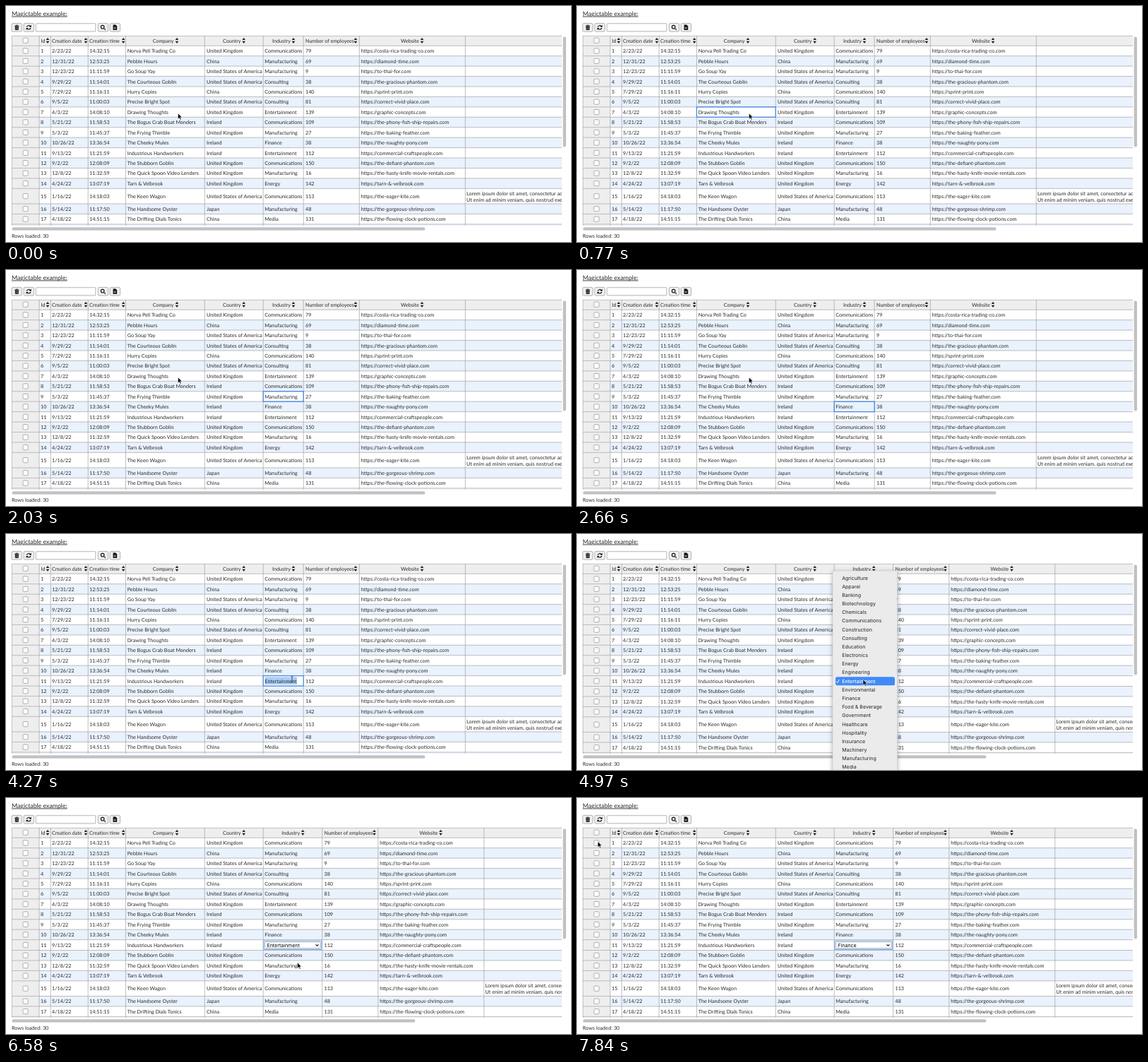
An HTML page that plays this animation: 800x334 px, repeating every 8000 ms.

```html
<!DOCTYPE html>
<html lang="en">
<head>
<meta charset="utf-8">
<title>Magictable example</title>
<style>
  html, body { margin: 0; width: 100%; height: 100%; overflow: hidden; background: #fff; }
  svg { display: block; }
  text {
    font: 7.23px Lato, sans-serif; font-variant-numeric: tabular-nums;
    fill: #2a2a2a; white-space: pre; text-rendering: geometricPrecision;
  }
  .title { font-size: 8.75px; text-decoration: underline; }
  .head { font-size: 7.15px; }
  .ui { font: 7.05px Inter, sans-serif; }
  .line { stroke: #a3a3a3; stroke-width: .7; fill: none; }
  .button { fill: #efefef; stroke: #858585; stroke-width: .6; }
  .box { fill: #fff; stroke: #7d7d7d; stroke-width: .6; }
  .focus { stroke: #3f86ea; stroke-width: 1.2; }
  .menu { fill: #ebebeb; stroke: #c4c4c4; stroke-width: .5; filter: drop-shadow(0 2px 3px #0005); }
</style>
</head>
<body>
<svg id="stage" width="800" height="334" viewBox="0 0 800 334">
  <g id="page"></g>
  <g id="menu"></g>
  <path id="arrow" d="M0 0V8L1.9 6.3L3.2 9.2L4.5 8.6L3.2 5.8H5.8Z" fill="#000" stroke="#fff" stroke-width=".5"/>
  <path id="beam" d="M-1.5 -4Q0 -4 0 -3Q0 -4 1.5 -4M0 -3V3M-1.5 4Q0 4 0 3Q0 4 1.5 4" fill="none" stroke="#222" stroke-width=".7"/>
</svg>
<script>
const LOOP = 8000, PITCH = 14.43, TOP = 56.3, WIDEN = 26.5;
const COMPANY = 4, COUNTRY = 5, INDUSTRY = 6;
const $ = id => document.getElementById(id);

// column edges, starting with the checkbox column
const edges = [8, 47, 63.3, 116.2, 169.5, 281.3, 364.2, 421.2, 500.3, 650.3];
const textX = [49, 65, 118, 171.7, 284, 366.2, 424, 502.7];

// label, text x, sort icon x
const heads = [
  ["Id", 49.6, 59], ["Creation date", 65, 113], ["Creation time", 118, 166.2],
  ["Company", 207.7, 242], ["Country", 307, 336.7], ["Industry", 377, 407],
  ["Number of employees", 424, 495], ["Website", 559, 589]
];

const countries = { U: "United Kingdom", A: "United States of America", C: "China", I: "Ireland", J: "Japan" };
const rows = `2/23/22|14:32:15|Norva Pell Trading Co|U|Communications|79|costa-rica-trading-co
12/31/22|12:53:25|Pebble Hours|C|Manufacturing|69|diamond-time
12/23/22|11:11:59|Go Soup Yay|A|Manufacturing|9|to-thai-for
9/29/22|11:14:01|The Courteous Goblin|A|Consulting|38|the-gracious-phantom
7/29/22|11:16:11|Hurry Copies|C|Communications|140|sprint-print
9/5/22|11:00:03|Precise Bright Spot|A|Consulting|81|correct-vivid-place
4/3/22|14:08:10|Drawing Thoughts|U|Entertainment|139|graphic-concepts
5/21/22|11:58:53|The Bogus Crab Boat Menders|I|Communications|109|the-phony-fish-ship-repairs
5/3/22|11:45:37|The Frying Thimble|U|Manufacturing|27|the-baking-feather
10/26/22|13:36:54|The Cheeky Mules|I|Finance|38|the-naughty-pony
9/13/22|11:21:59|Industrious Handworkers|I|Entertainment|112|commercial-craftspeople
9/2/22|12:08:09|The Stubborn Goblin|U|Communications|150|the-defiant-phantom
12/8/22|11:32:59|The Quick Spoon Video Lenders|U|Manufacturing|16|the-hasty-knife-movie-rentals
4/24/22|13:07:19|Tarn &amp; Velbrook|U|Energy|142|tarn-&amp;-velbrook
1/16/22|14:18:03|The Keen Wagon|A|Communications|113|the-eager-kite
5/14/22|11:17:50|The Handsome Oyster|J|Manufacturing|48|the-gorgeous-shrimp
4/18/22|14:51:15|The Drifting Dials Tonics|C|Media|131|the-flowing-clock-potions`
  .split("\n").map((line, i) => {
    const [date, time, company, country, industry, staff, site] = line.split("|");
    return [i + 1, date, time, company, countries[country], industry, staff, `https://${site}.com`];
  });

const options = ("Agriculture,Apparel,Banking,Biotechnology,Chemicals,Communications,Construction,Consulting," +
  "Education,Electronics,Energy,Engineering,Entertainment,Environmental,Finance,Food &amp; Beverage,Government," +
  "Healthcare,Hospitality,Insurance,Machinery,Manufacturing,Media").split(",");

const text = (x, y, s, attrs = "") => `<text x="${x}" y="${y}" ${attrs}>${s}</text>`;
const rect = (x, y, w, h, attrs) => `<rect x="${x}" y="${y}" width="${w}" height="${h}" ${attrs}/>`;
const path = (d, attrs = 'class="line"') => `<path d="${d}" ${attrs}/>`;
const checkbox = y => rect(24, y - 3.6, 7.2, 7.2, 'rx="1.4" class="box"');
const sortIcon = x => path(`M${x - 2.4} 48.1h4.8l-2.4-3.2zm0 1.6h4.8l-2.4 3.2z`, 'fill="#222"');

// row 15 holds two lines; the select makes row 11 slightly taller
const rowTop = (i, wide) => TOP + i * PITCH + (i > 14 ? 7.2 : 0) + (wide && i > 10 ? .5 : 0);

function toolbar() {
  const stroke = 'fill="none" stroke="#111" stroke-width="1.1"';
  return text(8, 13.6, "Magictable example:", 'class="title"') +
    [8, 25, 130.3, 147.2].map(x => rect(x, 24.6, 14.4, 11.6, 'rx="1.5" class="button"')).join("") +
    rect(42.3, 24.8, 84.6, 11.2, 'rx=".8" class="box"') +
    path("M12.2 27.4h1.9l.4-.7h1.6l.4.7h1.9v1h-6.2zm.4 1.5h5.4l-.4 5h-4.6z", 'fill="#111"') +
    path("M14 30v3M15.3 30v3M16.6 30v3", 'stroke="#efefef" stroke-width=".4"') +
    path("M29.4 29.8a3 3 0 0 1 5.2-1M35 31a3 3 0 0 1-5.2 1", stroke) +
    path("M35.8 26.7v3h-3zM28.6 34.1v-3h3z", 'fill="#111"') +
    `<circle cx="136.7" cy="29.7" r="2.3" ${stroke}/>` + path("M138.4 31.4l2.4 2.4", stroke) +
    path("M151.6 26.6h3.6l2 2v5.4h-5.6z", 'fill="#111"') +
    path("M153.2 29.7l2.2 2.9M155.4 29.7l-2.2 2.9", 'stroke="#fff" stroke-width=".7"');
}

function table(shift = 0) {
  const move = col => col > INDUSTRY ? shift : 0;
  let out = rect(8, 42, 780, 14.3, 'fill="#eee"');
  for (let i = 0; i < 18; i++) {
    const y = rowTop(i, shift), h = rowTop(i + 1, shift) - y, mid = y + h / 2;
    out += rect(8, y, 780, h, `fill="${i % 2 ? "#e9f2fd" : "#fff"}"`) +
      rect(8, y, 39, h, 'fill="#eee"') + path(`M8 ${y}H788`) + checkbox(mid);
    (rows[i] || []).forEach((s, c) => {
      out += text(textX[c] + move(c + 1), mid + 2.7, s);
    });
  }
  heads.forEach(([s, x, icon], c) => {
    const dx = c + 1 === INDUSTRY ? shift / 2 : move(c + 1);
    out += text(x + dx, 51.7, s, 'class="head"') + sortIcon(icon + dx);
  });
  out += checkbox(48.8) + path("M8 42.3H788") +
    edges.map((x, col) => path(`M${x + move(col) + (col ? 0 : .3)} 42V311`)).join("") +
    text(652 + shift, 268.4, "Lorem ipsum dolor sit amet, consectetur adipiscing elit") +
    text(652 + shift, 276.9, "Ut enim ad minim veniam, quis nostrud exercitation ullamco");
  return `<svg x="8" y="42" width="779" height="268.8" viewBox="8 42 779 268.8">${out}</svg>` +
    rect(788.6, 43.5, 4.4, 156, 'rx="2.2" fill="#c1c1c1"') +
    rect(8.5, 313.2, shift ? 571 : 585, 4.4, 'rx="2.2" fill="#c1c1c1"') +
    text(8, 327.9, "Rows loaded: 30");
}

const cell = (row, col, fill = "none") =>
  rect(edges[col], rowTop(row - 1), edges[col + 1] - edges[col], PITCH, `class="focus" fill="${fill}"`);

function editor() {
  const y = rowTop(10);
  return cell(11, INDUSTRY, "#fff") + rect(366.4, y + 1.8, 45.6, 10.6, 'fill="#a9cdf6"') +
    text(366.4, y + 9.9, "Entertainment");
}

const dropdown = value =>
  rect(364.7, 202, 82.2, 12.4, 'rx="1" fill="#fff" stroke="#6ea5ee" stroke-width="1.2"') +
  rect(366.4, 203.7, 78.8, 9, 'rx="1" class="box"') +
  text(369.4, 210.8, value, 'class="ui" style="fill:#000"') +
  path("M438.6 207.3l1.9 2l1.9-2", 'fill="none" stroke="#000" stroke-width="1.1"');

const menu = active =>
  rect(362, 52, 91.6, 300, 'rx="3" class="menu"') +
  options.map((s, i) => {
    const y = 62 + i * 12.18, on = i === active;
    return (on ? rect(366, y - 6, 84, 12, 'rx="2.5" fill="#3f8af7"') : "") +
      text(375.2, y + 2.5, s, `class="ui" style="fill:${on ? "#fff;font-weight:500" : "#222"}"`) +
      (s === "Entertainment" ? path(`M367 ${y + .4}l1.6 2l2.8-4.6`, `fill="none" stroke="${on ? "#fff" : "#222"}"`) : "");
  }).join("");

// start time, page content
const steps = [
  [0, () => table()],
  [420, () => table() + cell(7, COMPANY)],
  [840, () => table() + cell(7, COUNTRY)],
  [1190, () => table() + cell(8, COUNTRY)],
  [1680, () => table() + cell(8, INDUSTRY)],
  [2030, () => table() + cell(9, INDUSTRY)],
  [2380, () => table() + cell(10, INDUSTRY)],
  [2940, () => table() + cell(11, INDUSTRY)],
  [4200, () => table() + editor()],
  [4480, () => table(WIDEN) + dropdown("Entertainment")],
  [6650, () => table(WIDEN) + dropdown("Finance")]
];

// time, pointer tip
const route = [
  [0, 243.5, 152], [3430, 243.5, 152], [4060, 405, 205.5], [5180, 405, 206],
  [5600, 413.5, 229.8], [6160, 413.5, 229.8], [6400, 412.6, 233],
  [6930, 412.6, 233], [7700, 32.5, 66], [7840, 29.4, 61.8], [8000, 29.4, 61.8]
];

function pointer(t) {
  const i = route.findIndex(p => p[0] > t), [t0, x0, y0] = route[i - 1], [t1, x1, y1] = route[i];
  const u = (t - t0) / (t1 - t0), k = u * u * (3 - 2 * u);
  return [x0 + (x1 - x0) * k, y0 + (y1 - y0) * k];
}

const tools = toolbar();
let shownStep, shownItem;

function draw(now) {
  const t = now % LOOP, [x, y] = pointer(t);
  const step = steps.findLast(s => s[0] <= t);
  if (step !== shownStep) $("page").innerHTML = tools + (shownStep = step)[1]();

  const flash = t >= 5950 && t < 6090;
  const item = flash ? -1 : Math.round((y - 62) / 12.18);
  if (item !== shownItem) $("menu").innerHTML = menu(shownItem = item);
  $("menu").setAttribute("opacity", t < 4830 ? 0 : Math.max(0, Math.min(1, (6330 - t) / 170)));

  const typing = t >= 4200 && t < 4480;
  for (const [id, shown] of [["arrow", !typing], ["beam", typing]]) {
    $(id).setAttribute("transform", `translate(${x} ${y})`);
    $(id).setAttribute("opacity", +shown);
  }
  requestAnimationFrame(() => draw(performance.now() - start));
}

const start = performance.now();
draw(0);
</script>
</body>
</html>
```
